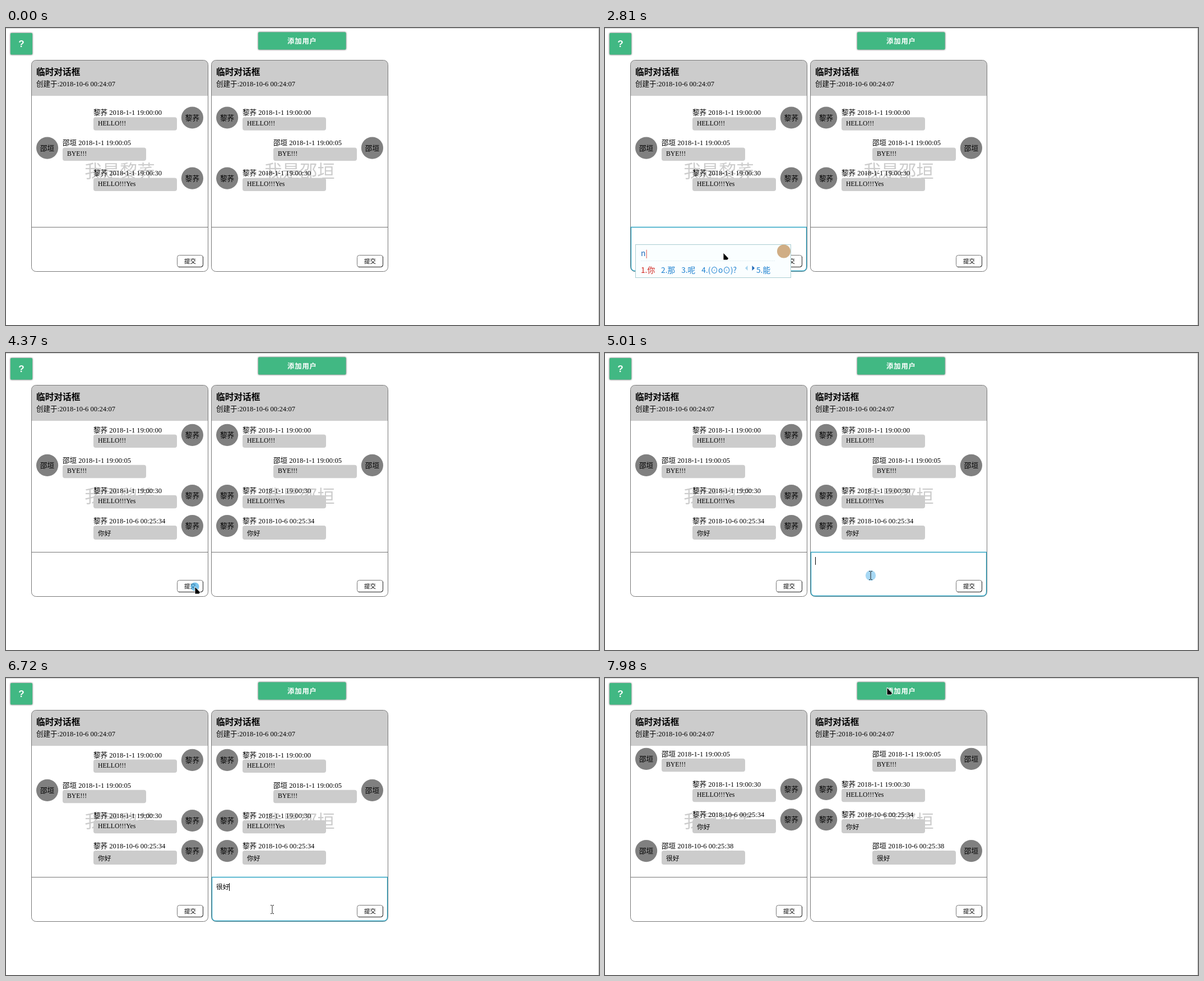
These frames come from a looping animation (1058x530 px, 8000 ms). An HTML page:

```html
<!DOCTYPE html>
<html lang="zh-CN">
<head>
<meta charset="utf-8">
<style>
html, body { margin: 0; width: 100%; height: 100%; overflow: hidden; background: #fff; }
svg { display: block; width: 1058px; height: 530px; }
text { font: 12.55px 'Liberation Serif', 'Noto Sans CJK SC', serif; white-space: pre; }
.mid { text-anchor: middle; }
.title { font-size: 15.68px; font-weight: bold; }
.mark { font-size: 31.35px; fill: #ccc; }
.body { font-size: 11.76px; }
.input { font: 11.76px 'Liberation Mono', 'Noto Sans CJK SC', monospace; }
.submit { font: 10.45px 'Liberation Sans', 'Noto Sans CJK SC', sans-serif; }
.green { font: bold 12.3px 'Liberation Sans', 'Noto Sans CJK SC', sans-serif; letter-spacing: .9px; fill: #fff; }
.help { font-size: 17px; letter-spacing: 0; }
.ime { font: 13.7px 'Noto Sans CJK SC', sans-serif; fill: #1d80d0; }
.btn { fill: #41b883; filter: drop-shadow(0 0 1.5px #555); }
.line { fill: none; stroke: #777; }
.focus { fill: none; stroke: #2ba3c2; stroke-width: 1.3; }
</style>
</head>
<body>
<svg id="stage" viewBox="0 0 1058 530"></svg>
<script>
const LOOP = 8000, GAP = 321;
const users = ['黎荞', '邵垣'];
const [A, B] = [0, 1];

// sender, time label, text, moment it appears
const messages = [
  [A, '2018-1-1 19:00:00', 'HELLO!!!', 0],
  [B, '2018-1-1 19:00:05', 'BYE!!!', 0],
  [A, '2018-1-1 19:00:30', 'HELLO!!!Yes', 0],
  [A, '2018-10-6 00:25:34', '你好', 4310],
  [B, '2018-10-6 00:25:38', '很好', 7550]
];

// moment, content of the focused input
const typing = [
  [700, ''], [1640, 'n'], [1690, 'ni'], [1850, 'nih'], [1930, 'niha'],
  [2190, 'nih'], [2270, 'ni'], [2350, 'n'], [2430, ''], [3360, '你好'],
  [4290, ''], [4850, ''], [6310, '很好'], [7530, '']
];

// moment, pinyin, candidates, width, x of the arrows, x of the last candidate
const ime = [
  [2810, 'n', '你 那 呢 (⊙o⊙)? 能', 277, 196, 216],
  [2890, 'ni', '你 尼 拟 泥 妮', 246],
  [3080, 'nih', '你好 你会 你和 你还 你活', 304],
  [3150, 'niha', '你哈 你还 你好 你 尼', 290],
  [3220, 'nihao', '你好 你好吗 你好啊 你好呀 你号', 359],
  [3360],
  [5760, 'h', '和 好 会 后 还', 246],
  [5840, 'he', '和 合 & 何 Σ', 236],
  [5930, 'hen', '很 恨 狠 痕 哼', 246],
  [6020, 'henh', '很好 很会 很和 很坏 很黑', 308],
  [6100, 'henha', '很好 很还 很哈 很 恨', 290],
  [6180, 'henhao', '很好 很号 很豪 很 恨', 290],
  [6310]
];

// moment, pointer position
const path = [
  [290, 207.5, 427], [490, 211, 401], [3790, 211, 401], [4230, 337, 417],
  [4420, 337, 417], [4570, 367, 412], [4820, 474, 397], [6700, 474, 397],
  [6720, 475, 413], [7080, 736, 461], [7420, 651, 417], [7700, 651, 417], [7980, 503, 17]
];
const clicks = [700, 4290, 4850, 7530];
const focus = [[700, 4290], [4850, 7530]];

const last = (list, t) => list.filter(e => e[0] <= t).pop();
const text = (x, y, s, cls = '', extra = '') => `<text x="${x}" y="${y}" class="${cls}" ${extra}>${s}</text>`;
const rect = (x, y, w, h, r, attr) => `<rect x="${x}" y="${y}" width="${w}" height="${h}" rx="${r}" ${attr}/>`;
const isCjk = s => s.charCodeAt(0) > 255;

function pointerAt(t) {
  const i = path.findIndex(p => p[0] > t);
  if (i == 0) return null;
  if (i < 0) return path[path.length - 1].slice(1);
  const [t0, x0, y0] = path[i - 1], [t1, x1, y1] = path[i];
  const k = (t - t0) / (t1 - t0), e = k * k * (3 - 2 * k);
  return [x0 + (x1 - x0) * e, y0 + (y1 - y0) * e];
}

function chat(owner, t) {
  const rows = messages.filter(m => m[3] <= t).slice(-4);
  const step = m => isCjk(m[2]) ? 56 : 54.1;
  let y = 160;
  if (rows.length > 3) y = 308.6 - rows.slice(0, -1).reduce((sum, m) => sum + step(m), 0);
  return rows.map(m => {
    const [who, time, body] = m, mine = who == owner, x = mine ? 156 : 101;
    const tall = isCjk(body);
    const out = `<circle cx="${mine ? 332.4 : 73.6}" cy="${y}" r="19.6" fill="#808080"/>`
      + text(mine ? 332.4 : 73.6, y + 4.5, users[who], 'mid')
      + rect(x, y - .7, 149, tall ? 25 : 23.5, 4, 'fill="#ccc"')
      + text(x, y - 4.8, users[who] + ' ' + time)
      + text(x + 7.9, y + (tall ? 17.4 : 13.5), body, 'body');
    y += step(m);
    return out;
  }).join('');
}

function inputBox(t) {
  const [since, value] = last(typing, t);
  const cjk = isCjk(value);
  const x = Math.floor(54 + value.length * (cjk ? 11.76 : 7.06)) + .5, y = cjk ? 366 : 364;
  const lit = (t - since) % 1000 < 505 && !(t >= 2530 && t < 3360) && !(last(ime, t) || [])[1];
  return '<path class="focus" d="M46.5 355.5H359.5V426q0 7.5-7.5 7.5H54q-7.5 0-7.5-7.5Z"/>'
    + text(54, 377, value, 'input')
    + (lit ? `<path d="M${x} ${y}v14" stroke="#000"/>` : '');
}

function panel(owner, t) {
  const [from, to] = focus[owner];
  return `<g transform="translate(${owner * GAP})">`
    + '<path d="M46 121V66q0-8 8-8H352q8 0 8 8V121Z" fill="#ccc"/>'
    + text(54, 83.5, '临时对话框', 'title')
    + text(54, 103.5, '创建于:2018-10-6 00:24:07')
    + text(203, 267, '我是' + users[owner], 'mid mark')
    + chat(owner, t)
    + '<path class="line" d="M46 355.5H360"/>'
    + rect(45.5, 57.5, 315, 377, 8, 'class="line"')
    + (t >= from && t < to ? inputBox(t) : '')
    + rect(305.5, 405.5, 46, 21, 4, 'fill="#fff" stroke="#777"')
    + '<path d="M351.5 408V422.5q0 4-4 4H308" fill="none" stroke="#222"/>'
    + text(328.5, 420.4, '提交', 'mid submit')
    + '</g>';
}

function imePopup(t) {
  const [since, pinyin, words, w, nav = w - 45, lastX] = last(ime, t) || [];
  if (!pinyin) return '';
  const spans = words.split(' ').map((word, i) => {
    const pos = i == 4 && lastX ? `x="${54 + lastX}"` : i ? 'dx="11"' : 'fill="#d0201a"';
    return `<tspan ${pos}>${i + 1}.${word.replace('&', '&amp;')}</tspan>`;
  }).join('');
  const n = 54 + nav;
  return `<g transform="translate(${since > 5000 ? GAP : 0})">`
    + rect(54.5, 386.5, w, 59, 0, 'fill="#fafeff" stroke="#a9cdd2"')
    + `<path d="M64 415.5H${54 + w - 28}" stroke="#e2eff3" stroke-dasharray="2 1"/>`
    + `<circle cx="${54 + w - 12}" cy="398.5" r="12" fill="#d0ad84"/>`
    + text(64, 407, pinyin + '<tspan fill="#d8382c">|</tspan>', 'ime', 'style="fill:#1d68b8"')
    + text(64, 436.5, spans, 'ime')
    + `<path d="M${n + 4.5} 424v9l-4.5-4.5z" fill="#a8d4ee"/>`
    + `<path d="M${n + 12.5} 424v9l4.5-4.5z" fill="#1d68b8"/></g>`;
}

function pointer(t) {
  const p = pointerAt(t);
  if (!p) return '';
  const [x, y] = p;
  const inside = (l, top, r, bottom) => [0, GAP].some(d => x > l + d && x < r + d && y > top && y < bottom);
  const beam = inside(46, 356, 360, 434) && !inside(305, 405, 352, 427) && !(last(ime, t) || [])[1];
  const age = t - last(clicks.map(c => [c]), t)?.[0];
  const ring = age < 280
    ? `<circle cx="${x}" cy="${y}" r="${6 + age / 50}" fill="#3aa8e6" opacity="${.9 * (1 - age / 320)}"/>` : '';
  const shape = beam
    ? '<path d="M-3-7.5H-1L0-6.5 1-7.5H3M0-6.5V6.5M-3 7.5H-1L0 6.5 1 7.5H3" fill="none" stroke="#222"/>'
    : '<path d="M0 0V13H7.5L9.5 10Z" stroke="#fff" stroke-width=".9"/>';
  return ring + `<g transform="translate(${x} ${y})">${shape}</g>`;
}

const page = '<path d="M0 .5H1058" stroke="#ccc"/><path d="M1057.5 0V530" stroke="#bbb"/>'
  + rect(8, 9, 39, 38.5, 1.5, 'class="btn"') + text(27.5, 34.3, '?', 'mid green help')
  + rect(450, 7.5, 156.5, 31, 1.5, 'class="btn"') + text(528.4, 27.6, '添加用户', 'mid green');

const stage = document.getElementById('stage');
let shown = '';
function draw(now) {
  const t = now % LOOP;
  const next = page + panel(A, t) + panel(B, t) + imePopup(t) + pointer(t);
  if (next != shown) stage.innerHTML = shown = next;
  requestAnimationFrame(draw);
}
draw(performance.now());
</script>
</body>
</html>
```
